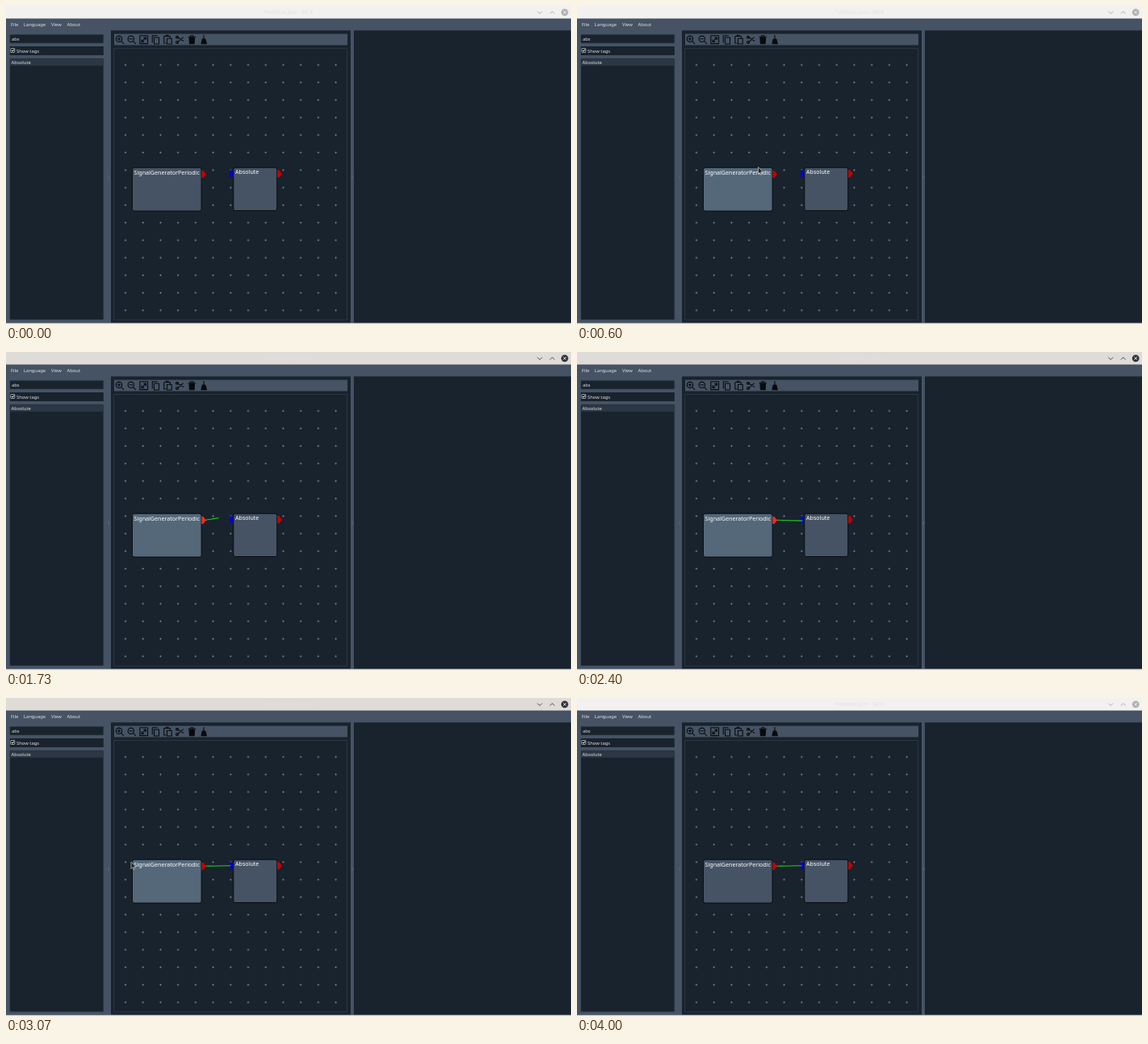
Animation of 700 by 394 pixels, one loop 4070 ms. Source, as an HTML page:

```html
<!DOCTYPE html>
<html lang="en">
<head>
<meta charset="utf-8">
<title>Node editor</title>
<style>
  html, body { margin: 0; width: 100%; height: 100%; overflow: hidden; background: #19232d; }
  svg { display: block; width: 100%; height: 100%; }
  text { font-family: "Noto Sans", sans-serif; font-size: 5.85px; fill: #e0e1e3; white-space: pre; }
  .title { font-size: 6.35px; text-anchor: middle; }
  .label { font-size: 7.1px; fill: #fff; }
  .dark { fill: #19232d; }
  .frame { fill: #19232d; stroke: #37434f; stroke-width: .6; }
  .node { stroke: #05080b; stroke-width: .9; }
  .icon { fill: none; stroke: #080b0e; stroke-width: 1.1; stroke-linejoin: round; stroke-linecap: round; }
  .solid { fill: #080b0e; }
  .button { fill: none; stroke-width: .9; }
  .cursor { fill: #20262b; stroke: #e8e8e8; stroke-width: .6; stroke-linejoin: round; }
</style>
</head>
<body>
<svg viewBox="0 0 700 394">
  <rect width="700" height="394" fill="#455364"/>

  <!-- title bar -->
  <rect id="bar" width="700" height="15.5"/>
  <text id="title" class="title" x="350" y="10">*untitled.json - MCA</text>
  <g id="buttons" class="button">
    <path d="M658.3 6.6l2.9 2.9 2.9-2.9M673.9 9.5l2.9-2.9 2.9 2.9"/>
  </g>
  <circle id="close" cx="692.2" cy="7.8" r="4.4"/>
  <path d="M690.4 6l3.6 3.6m0-3.6l-3.6 3.6" stroke="#f4f2f0" stroke-width=".9"/>

  <!-- menu -->
  <text x="6" y="25.3">File</text>
  <text x="21.8" y="25.3">Language</text>
  <text x="56" y="25.3">View</text>
  <text x="75.5" y="25.3">About</text>

  <!-- block list -->
  <rect class="frame" x="4.8" y="35.3" width="116" height="10.8" rx="1"/>
  <text x="7" y="42.7">abs</text>
  <rect class="dark" x="4.8" y="50" width="116" height="11"/>
  <rect x="5.8" y="52.5" width="5" height="5" rx=".8" fill="#19232d" stroke="#d0d3d6" stroke-width=".7"/>
  <path d="M7 55l1.1 1.2 2-2.6" fill="none" stroke="#fff" stroke-width=".9"/>
  <text x="13" y="57.6">Show tags</text>
  <rect class="frame" x="4.8" y="65" width="116" height="323.7" rx="1"/>
  <rect x="5.2" y="65.6" width="115.2" height="8.2" fill="#2b3744"/>
  <text x="6.6" y="71.8">Absolute</text>

  <!-- centre and right panes -->
  <rect class="dark" x="130" y="30.3" width="297" height="362.2"/>
  <rect class="dark" x="431" y="30.3" width="269" height="362.2"/>
  <path d="M127.2 210v4M429 210v4" stroke="#788491" stroke-width=".8" stroke-dasharray=".8 .8"/>
  <rect x="134" y="34.5" width="289" height="14" fill="#455364"/>
  <rect class="frame" x="133.8" y="52.3" width="288.8" height="336.6" stroke="#455364"/>
  <rect y="392.8" width="700" height="1.2" fill="#d8dadb"/>

  <!-- tools -->
  <g class="icon">
    <circle cx="140" cy="40.8" r="3.7"/><path d="M142.8 43.6l3 3M138.2 40.8h3.6M140 39v3.6"/>
    <circle cx="154.8" cy="40.8" r="3.7"/><path d="M157.6 43.6l3 3M153 40.8h3.6"/>
    <path d="M165.8 36.8h9.8v9.8h-9.8zM168 44.4l5.4-5.4m-2.7 0h2.7v2.7M168 41.7v2.7h2.7"/>
    <path d="M183.5 39h6v8h-6zM181.3 45v-8.2h6"/>
    <path d="M198 46h-2.2v-8.5h7.5v2M198.2 37.5v-1.2h2.8v1.2M199.5 40.3h5.8v6.7h-5.8z"/>
    <path d="M211.8 38.2l8 5M212.2 45.3l7.2-6.5"/>
    <circle cx="212" cy="38.8" r="1.5"/><circle cx="212" cy="45" r="1.5"/>
    <path d="M226 38.3h8.6M228.6 38v-1.3h3.4V38"/>
    <path class="solid" d="M227 39.4h6.6l-.5 7.2h-5.6z"/>
    <path d="M245 36.5v4"/>
    <path class="solid" d="M243.2 41h3.6l1.6 5.6h-6.4z"/>
  </g>

  <path id="grid" fill="none" stroke="#87919a" stroke-width=".65"/>

  <!-- blocks -->
  <rect id="source" class="node" x="156.5" y="200.2" width="85.6" height="53.8" rx="2.5"/>
  <text class="label" x="158.6" y="208.6">SignalGeneratorPeriodic</text>
  <path id="output" d="M242.4 203.7h1.8l3.8 4.7-3.8 4.7h-1.8z"/>
  <path id="input" d="M277.3 203h1.7l3.2 4.7-3.2 4.7h-1.7z"/>
  <rect id="absolute" class="node" x="281.8" y="200.2" width="54" height="53.3" rx="2.5"/>
  <text class="label" x="284" y="207.9">Absolute</text>
  <path d="M336.2 202.9h1.8l3.8 4.8-3.8 4.8h-1.8z" fill="#c80000"/>
  <path id="wire" fill="none" stroke="#1fd01f" stroke-width="1.1"/>

  <path id="arrow" class="cursor" d="M0 0v8.6l2-1.8 1.3 2.9 1.3-.6-1.3-2.8h2.7z"/>
  <path id="hand" class="cursor" d="M-.7.2q.7-.7 1.3 0v3l3.2.8q.9.3.8 1.2l-.6 3.8h-3.8l-2.4-3.5q0-1 .9-.8l.6.6z"/>
</svg>
<script>
  const LOOP = 4070, STEP = 1000 / 15;
  const el = id => document.getElementById(id);
  const set = (id, name, value) => el(id).setAttribute(name, value);
  const clamp = v => Math.min(1, Math.max(0, v));
  const mix = (a, b, p) => a + (b - a) * p;
  const blend = (a, b, p) => `rgb(${a.map((v, i) => Math.round(mix(v, b[i], p)))})`;

  // Points are [step, x, y]; positions hold before the first and after the last.
  function follow(points, step) {
    let i = 0;
    while (i < points.length - 2 && step >= points[i + 1][0]) i++;
    const [s0, x0, y0] = points[i], [s1, x1, y1] = points[i + 1];
    const p = clamp((step - s0) / (s1 - s0));
    return [mix(x0, x1, p), mix(y0, y1, p)];
  }

  const approach = [[2, 4, 203], [5, 110, 208], [8, 215, 201], [9, 224.5, 199.5],
                    [13, 236, 203], [16, 243.8, 205.5], [18, 244, 206]];
  const retreat = [[41, 280, 208], [43, 280, 208], [44, 268, 207], [45, 222, 205],
                   [46, 155, 203], [47, 80, 202], [48, 17, 202], [50, 2, 202]];
  const wireEnd = [[23, 248, 208.2], [25, 256, 207], [26, 263.5, 205.5], [29, 274, 206],
                   [32, 280, 210.5], [34, 280, 210.5], [38, 278.5, 207.8]];

  let crosses = "";
  for (let row = 0; row < 15; row++)
    for (let col = 0; col < 13; col++) {
      const x = 148 + col * 21.72, y = 73 + row * 21.72;
      crosses += `M${x - 1.3} ${y}h2.6M${x} ${y - 1.3}v2.6`;
    }
  set("grid", "d", crosses);

  function place(id, shown, [x, y]) {
    set(id, "visibility", shown ? "visible" : "hidden");
    set(id, "transform", `translate(${x} ${y})`);
  }

  function draw(step) {
    const active = step >= 60 ? 0 : clamp((step - 19) / 3);
    set("bar", "fill", blend([243, 241, 239], [223, 219, 215], active));
    set("title", "fill", blend([126, 128, 130], [40, 44, 48], active));
    set("buttons", "stroke", blend([164, 165, 166], [58, 63, 68], active));
    set("close", "fill", blend([176, 177, 178], [45, 50, 55], active));

    const leaving = step >= 41;
    const pointer = follow(leaving ? retreat : approach, step);
    const inSource = leaving ? step >= 45 && step < 47 : step >= 7;
    const inAbsolute = leaving && step < 44;
    const fill = hot => hot ? "#54687a" : "#455364";
    set("source", "fill", fill(inSource));
    set("absolute", "fill", fill(inAbsolute));
    set("output", "fill", step >= 16 && !leaving ? "#ff2a20" : "#c80000");
    set("input", "fill", inAbsolute ? "#3030ff" : "#0000dc");

    const onPort = leaving ? step < 44 : step >= 16;
    const visible = step >= 2 && step < 23 || leaving && step < 51;
    place("arrow", visible && !onPort, pointer);
    place("hand", visible && onPort, pointer);

    const [x, y] = follow(wireEnd, step);
    set("wire", "d", step < 24 ? "" : `M247.5 208.3L${x} ${y}`);
  }

  const start = performance.now();
  function tick() {
    const time = (performance.now() - start) % LOOP;
    draw(Math.floor((time + 3.4) / STEP));
    requestAnimationFrame(tick);
  }
  tick();
</script>
</body>
</html>
```
